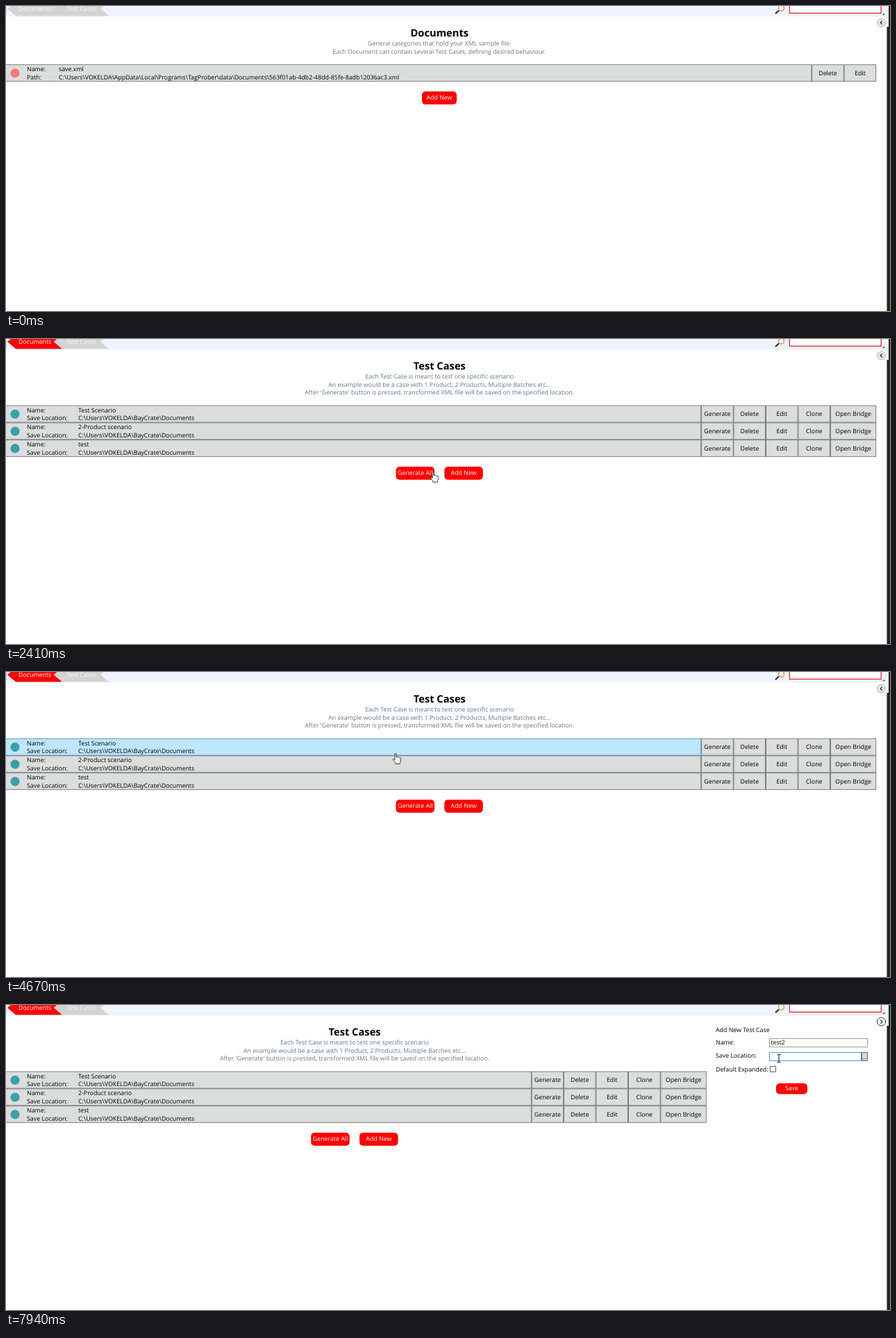
Recreate the animation shown at these times as an HTML page with a canvas. Size 1273x440 px, loop 8 s.

```html
<!DOCTYPE html>
<html lang="en">
<head>
<meta charset="utf-8">
<title>Test case manager</title>
<style>
html, body { margin: 0; width: 1273px; height: 440px; overflow: hidden; background: #fff; }
canvas { display: block; }
</style>
</head>
<body>
<canvas id="stage" width="1273" height="440"></canvas>
<script>
const ctx = document.getElementById('stage').getContext('2d');
const LOOP = 8000, STEP = 67.8, ROW = 24.8;
const RED = '#ff0000', GREY = '#dcdddd', LINE = '#666', INK = '#000';
const FONT = '"Open Sans", "Noto Sans", sans-serif';

const OPEN_FIRST = 22, BACK = 51, OPEN_AGAIN = 68, PANEL = 84;
const FOCUS_NAME = 97, FOCUS_PLACE = 115;

// Pointer path: step, x, y
const path = [
  [2, 1192, 402], [4, 1030, 300], [7, 724, 153], [9, 640, 106], [10, 612, 95], [11, 602, 84],
  [13, 602, 84], [15, 603, 88], [21, 603, 88], [25, 624, 141], [32, 637, 196],
  [35, 637, 196], [38, 572, 185], [44, 111, 28], [47, 62, 9], [50, 45, 4], [51, 45, 4],
  [57, 463, 119], [59, 500, 132], [64, 540, 97], [67, 540, 97],
  [72, 592, 150], [76, 668, 214], [78, 671, 204], [80, 665, 194], [84, 665, 194],
  [88, 950, 95], [91, 1085, 59], [92, 1088, 57], [95, 1110, 54], [104, 1110, 54],
  [106, 1111, 74], [109, 1111, 74], [112, 1114, 79], [117, 1113, 77]
];

const place = 'C:\\Users\\VOKELDA\\BayCrate\\Documents';
const docs = {
  title: 'Documents',
  notes: ['General categories that hold your XML sample file.',
    'Each Document can contain several Test Cases, defining desired behaviour.'],
  top: 84.3, dot: '#f27d84', valueX: 76, label: 'Path:',
  rows: [['save.xml', 'C:\\Users\\VOKELDA\\AppData\\Local\\Programs\\TagProber\\data\\Documents\\563f01ab-4db2-48dd-85fe-8adb12036ac3.xml']],
  edges: [1160.3, 1206.7, 1253.2], actions: ['Delete', 'Edit'],
  buttons: [['Add New', 599, 50]], buttonY: 123.3
};
const cases = {
  title: 'Test Cases',
  notes: ['Each Test Case is meant to test one specific scenario',
    'An example would be a case with 1 Product, 2 Products, Multiple Batches etc...',
    "After 'Generate' button is pressed, transformed XML file will be saved on the specified location."],
  top: 95.7, dot: '#3aa1a8', valueX: 104, label: 'Save Location:',
  rows: [['Test Scenario', place], ['2-Product scenario', place], ['test', place]],
  edges: [1001.2, 1047.6, 1094, 1140.5, 1187, 1253.2],
  actions: ['Generate', 'Delete', 'Edit', 'Clone', 'Open Bridge'],
  buttons: [['Generate All', 561.5, 55.5], ['Add New', 631.3, 55.5]], buttonY: 184.3
};

function text(str, x, midY, color = INK, align = 'left', font = '8.82px ') {
  ctx.font = font + FONT;
  ctx.fillStyle = color;
  ctx.textAlign = align;
  ctx.fillText(str, x, Math.round(midY + 3.2));
}

// The border lies inside the box
function box(x, y, w, h, fill, border, width = .8) {
  if (border) {
    ctx.fillStyle = border;
    ctx.fillRect(x, y, w, h);
    x += width; y += width; w -= 2 * width; h -= 2 * width;
  }
  ctx.fillStyle = fill;
  ctx.fillRect(x, y, w, h);
}

function shape(d, fill, stroke, width = 1) {
  const p = new Path2D(d);
  if (fill) { ctx.fillStyle = fill; ctx.fill(p); }
  if (stroke) { ctx.strokeStyle = stroke; ctx.lineWidth = width; ctx.stroke(p); }
}

function disc(x, y, r, fill, stroke, width = 1) {
  ctx.beginPath();
  ctx.arc(x, y, r, 0, 7);
  ctx.fillStyle = fill;
  ctx.fill();
  if (stroke) { ctx.strokeStyle = stroke; ctx.lineWidth = width; ctx.stroke(); }
}

function pill(label, x, y, w, h) {
  ctx.beginPath();
  ctx.roundRect(x, y, w, h, 5);
  ctx.fillStyle = RED;
  ctx.fill();
  text(label, x + w / 2, y + h / 2 - .5, '#fff', 'center');
}

function header(onCases, open) {
  box(0, 0, 1268, 15.5, '#edf4fd');
  for (let y = 1; y < 12; y += 3) box(0, y, 1, 1, '#8a8f98');
  shape('M2 4L14 -6H80L69 4L81 14.3H14Z', onCases ? RED : '#d3d3d3');
  shape('M69 4L81 -6H147L136 4L148 14.3H81Z', '#d3d3d3');
  text('Documents', 18, 4, '#fff');
  text('Test Cases', 87.5, 4, '#f7f7f7');

  shape('M1113 6.5L1108 11', null, '#222', 2);
  disc(1116.5, 3, 4, '#f4f6fa', '#d28442', 1.3);
  box(1127.7, -5, 133, 15.8, '#fff', RED, 1.1);
  shape('M1262 11.5H1266L1264 13.5Z', '#333');

  box(1271, 0, 2, 30, '#26261f');
  box(1268.5, 30, 4.5, 410, '#26261f');
  disc(1260.5, 24, 6, open ? '#fff' : '#e6e6e6', open ? '#333' : '#b5b5b5');
  shape(open ? 'M1259.3 21.3L1262 24L1259.3 26.7' : 'M1261.7 21.5L1259.2 24L1261.7 26.5', null, '#333', 1.3);
}

function hoveredRow(page, x, y, shift) {
  if (x > page.edges[0] - shift) return -1;
  const i = Math.floor((y - page.top) / ROW);
  return i < page.rows.length ? Math.max(i, -1) : -1;
}

function drawPage(page, hover, shift) {
  const mid = 624.3 - shift / 2;
  text(page.title, mid, 41, INK, 'center', 'bold 14.7px ');
  page.notes.forEach((s, i) => text(s, mid, 54 + i * 11.3, '#66778a', 'center'));

  const edges = page.edges.map(x => x - shift);
  page.rows.forEach(([name, value], i) => {
    const y = page.top + i * ROW, lit = i === hover;
    edges.slice(1).forEach((right, k) => {
      box(edges[k], y, right - edges[k], ROW, GREY, LINE);
      text(page.actions[k], (edges[k] + right) / 2, y + 12.2, INK, 'center');
    });
    box(-1, y, edges[0] + 1, ROW, lit ? '#bee6fd' : GREY, lit ? '#3c7fb1' : LINE);
    disc(13, y + 12.6, 6.6, page.dot);
    text('Name:', 30, y + 6.6);
    text(name, page.valueX, y + 6.6);
    text(page.label, 30, y + 18);
    text(value, page.valueX, y + 18);
  });
  for (const [label, x, w] of page.buttons) pill(label, x - shift / 2, page.buttonY, w, 18.7);
}

function drawPanel(step, x, y) {
  const border = (focused, over) => focused ? '#569de5' : over ? '#7eb4ea' : '#9a9ca2';
  const typed = step >= 105 ? 5 : Math.max(0, Math.min(4, step - 98));
  text('Add New Test Case', 1022, 36);
  text('Name:', 1022, 53.5);
  text('Save Location:', 1022, 72.5);
  text('Default Expanded:', 1022, 93);
  box(1099, 48, 142, 13, '#fff', border(step >= FOCUS_NAME && step < FOCUS_PLACE, overName(x, y)), 1);
  text('test2'.slice(0, typed), 1101.5, 54);
  box(1099, 68, 133, 13, '#fff', border(step >= FOCUS_PLACE, overPlace(x, y)), 1);
  box(1232, 68, 9, 13, GREY, LINE, 1);
  for (let i = 0; i < 3; i++) box(1234 + i * 2, 77, 1, 1, '#222');
  box(1100, 88, 9, 9, '#fff', LINE, 1);
  pill('Save', 1109, 113, 45, 15.5);
}

const overName = (x, y) => x > 1099 && x < 1240 && y > 48 && y < 61;
const overPlace = (x, y) => x > 1099 && x < 1232 && y > 67 && y < 81;

function drawPointer(kind, x, y) {
  ctx.save();
  ctx.translate(x, y);
  if (kind === 'beam') {
    shape('M-2.5 -5.5H-.5L0 -5L.5 -5.5H2.5M0 -5V5M-2.5 5.5H-.5L0 5L.5 5.5H2.5', null, '#111');
  } else if (kind === 'hand') {
    shape('M-1 0Q0 -1.2 1 0V5L2 4.4L3.3 5.2L4.6 4.9L5.6 5.8L7 5.8Q8 6.4 7.7 9L6.4 12.5V14.5H0V13L-3.5 8.8Q-4.2 7.2 -2.8 7.2L-1 8.8Z', '#fff', '#111', .8);
  } else {
    shape('M.5 .5V11.3L3 9L4.7 12.8L6.5 12L4.9 8.3H8.2Z', '#fff', '#111', .8);
  }
  ctx.restore();
}

function pointerAt(step) {
  const next = path.findIndex(p => p[0] > step);
  if (next < 0) return path[path.length - 1].slice(1);
  if (next === 0) return null;
  const [a, x0, y0] = path[next - 1], [b, x1, y1] = path[next];
  const k = (step - a) / (b - a);
  return [Math.round(x0 + (x1 - x0) * k), Math.round(y0 + (y1 - y0) * k)];
}

function draw(now) {
  const step = Math.floor((now % LOOP) / STEP + .45);
  const onCases = step >= OPEN_FIRST && step < BACK || step >= OPEN_AGAIN;
  const open = step >= PANEL;
  const page = onCases ? cases : docs;
  const shift = open ? 244.5 : 0;
  const pos = pointerAt(step);
  const [x, y] = pos || [-99, -99];
  const hover = pos ? hoveredRow(page, x, y, shift) : -1;

  ctx.textRendering = 'geometricPrecision';
  box(0, 0, 1273, 440, '#fff');
  header(onCases, open);
  drawPage(page, hover, shift);
  if (open) drawPanel(step, x, y);

  if (pos) {
    const onButton = page.buttons.some(([, left, w]) =>
      x > left - shift / 2 && x < left + w - shift / 2 && y > page.buttonY && y < page.buttonY + 18.7);
    const onTab = onCases && y < 14 && x < 75;
    const inField = open && (overName(x, y) || overPlace(x, y));
    drawPointer(inField ? 'beam' : hover >= 0 || onButton || onTab ? 'hand' : 'arrow', x, y);
  }
  requestAnimationFrame(draw);
}
requestAnimationFrame(draw);
</script>
</body>
</html>
```
